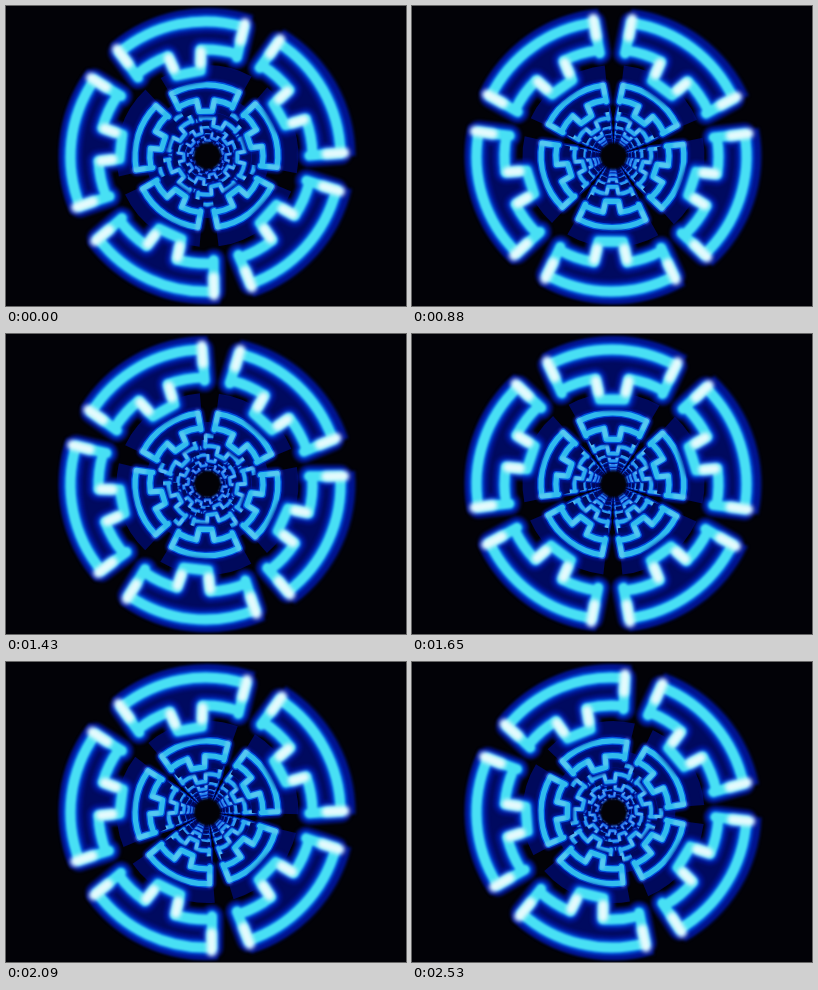
Write an HTML page with a canvas that moves like this. It is 400 px wide and 300 px high and loops after 2640 ms.

```html
<!DOCTYPE html>
<html lang="en">
<head>
<meta charset="utf-8">
<title>Neon tunnel</title>
<style>
html, body { margin: 0; width: 100%; height: 100%; overflow: hidden; background: #020207; }
canvas { display: block; }
</style>
</head>
<body>
<canvas id="stage" width="400" height="300"></canvas>
<script>
const ctx = document.getElementById('stage').getContext('2d');
const STEP = 110, STEPS = 24, RINGS = 9;
const HUB_X = 201.5, HUB_Y = 150;
const OUTER = 135, INNER = 107, NOTCH = 86;
const rad = deg => deg * Math.PI / 180;

// [step, drift of the nearest ring, twist of the ring behind it], in degrees
const KEYS = [
  [0, 29.5, -10.5], [4, 29.4, 0], [8, 29.5, 0], [11, 26.4, 10.6],
  [15, 26.6, 0], [19, 25.6, 0], [23, 25.4, -6], [24, 29.5, -10.5]
];

function pose(step) {
  const i = KEYS.findIndex(key => key[0] > step);
  const a = KEYS[i - 1], b = KEYS[i];
  const p = (step - a[0]) / (b[0] - a[0]);
  const mix = n => a[n] + (b[n] - a[n]) * p;
  return { spin: mix(1) - 15 * step, twist: mix(2) };
}

const polar = (r, deg) => [r * Math.cos(rad(deg)), r * Math.sin(rad(deg))];

// Bracket outline with a notch on the inner side
const bracket = new Path2D();
bracket.arc(0, 0, OUTER, rad(-28), rad(28));
bracket.lineTo(...polar(INNER - 3, 29));
bracket.arc(0, 0, INNER, rad(28), rad(9), true);
bracket.lineTo(...polar(NOTCH, 8.2));
bracket.lineTo(...polar(NOTCH, -8.2));
bracket.arc(0, 0, INNER, rad(-9), rad(-28), true);
bracket.lineTo(...polar(INNER - 3, -29));
bracket.closePath();

// Bright spots on the end caps and the notch sides
const sparks = new Path2D();
for (const side of [-1, 1]) {
  sparks.moveTo(...polar(121, side * 28.3));
  sparks.lineTo(...polar(139, side * 28));
  sparks.moveTo(...polar(93, side * 8.4));
  sparks.lineTo(...polar(105, side * 9));
}

function sector(inner, outer, half) {
  const path = new Path2D();
  path.arc(0, 0, outer, rad(-half), rad(half));
  path.arc(0, 0, inner, rad(half), rad(-half), true);
  path.closePath();
  return path;
}

// Navy light behind each bracket; it reaches further in the deeper rings
const halo = sector(118, 148, 29.5);
const haze = sector(84, 172, 30);

function stroke(path, color, width, blur) {
  ctx.filter = `blur(${blur}px)`;
  ctx.strokeStyle = color;
  ctx.lineWidth = width;
  ctx.stroke(path);
}

function fill(path, color, blur) {
  ctx.filter = `blur(${blur}px)`;
  ctx.fillStyle = color;
  ctx.fill(path);
}

function drawRing(depth, angle) {
  const scale = 1 / (1 + 0.89 * depth);
  const soft = Math.max(scale, 0.35);
  const core = depth ? `rgb(${50 - depth}, ${205 - depth * 17}, 238)` : 'rgb(72, 224, 244)';
  for (let i = 0; i < 5; i++) {
    ctx.save();
    ctx.translate(HUB_X, HUB_Y);
    ctx.rotate(rad(-angle - i * 72));
    ctx.scale(scale, scale);
    fill(depth ? haze : halo, depth ? 'rgb(0, 9, 92)' : 'rgb(0, 20, 140)', 1.5 * soft);
    ctx.restore();

    ctx.save();
    ctx.translate(HUB_X - 2 * scale, HUB_Y + 0.5 * scale);
    ctx.rotate(rad(-angle - i * 72));
    ctx.scale(scale, scale);
    fill(bracket, 'rgb(0, 10, 96)', 1.5 * soft);
    stroke(bracket, 'rgba(0, 20, 150, 0.85)', 23, 1.8 * soft);
    stroke(bracket, 'rgb(0, 84, 222)', 15, 1.5 * soft);
    stroke(bracket, core, 10, 1.2 * soft);
    stroke(sparks, `rgba(238, 252, 253, ${depth ? 0.2 : 0.95})`, 10, 2.2 * soft);
    ctx.restore();
  }
}

function draw(step) {
  const { spin, twist } = pose(step);
  ctx.fillStyle = '#020207';
  ctx.fillRect(0, 0, 400, 300);
  for (let depth = RINGS - 1; depth >= 0; depth--) {
    drawRing(depth, spin + twist * depth * (depth + 1) / 2);
  }
  ctx.save();
  ctx.filter = 'blur(1px)';
  ctx.fillStyle = '#020207';
  ctx.beginPath();
  ctx.arc(HUB_X, HUB_Y, 13.5, 0, 2 * Math.PI);
  ctx.fill();
  ctx.restore();
}

ctx.lineJoin = ctx.lineCap = 'round';
const start = performance.now();
let shown = -1;

function tick() {
  const step = Math.floor((performance.now() - start) / STEP) % STEPS;
  if (step !== shown) draw(shown = step);
  requestAnimationFrame(tick);
}
tick();
</script>
</body>
</html>
```
